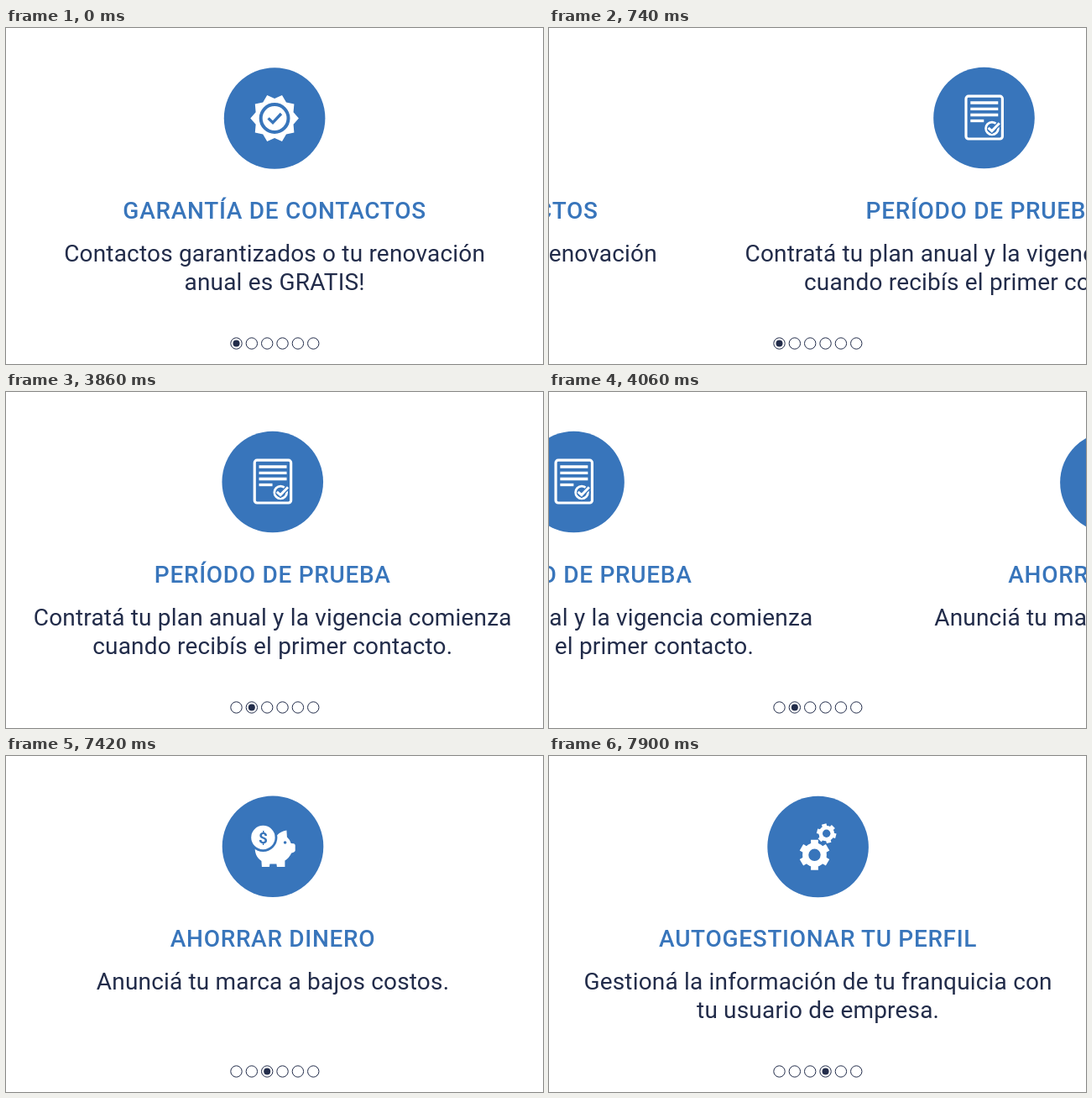
Write an HTML page with a canvas that moves like this. It is 640x400 px and loops after 8000 ms.

```html
<!DOCTYPE html>
<html lang="es">
<head>
<meta charset="utf-8">
<title>Beneficios</title>
<style>
  html, body { margin: 0; width: 100%; height: 100%; overflow: hidden; background: #fff; }
  canvas { display: block; width: 640px; height: 400px; }
</style>
</head>
<body>
<canvas id="stage"></canvas>
<script>
const W = 640, H = 400, LOOP = 8000;
const BLUE = '#3875bb', NAVY = '#222c4a', WHITE = '#fff';
const canvas = document.getElementById('stage');
const ctx = canvas.getContext('2d');
const ratio = window.devicePixelRatio || 1;
canvas.width = W * ratio;
canvas.height = H * ratio;

const slides = [
  { title: 'GARANTÍA DE CONTACTOS', cx: 320.1, cy: 107.5, icon: drawBadge,
    lines: ['Contactos garantizados o tu renovación', 'anual es GRATIS!'] },
  { title: 'PERÍODO DE PRUEBA', cx: 320.7, cy: 107, icon: drawDocument,
    lines: ['Contratá tu plan anual y la vigencia comienza', 'cuando recibís el primer contacto.'] },
  { title: 'AHORRAR DINERO', cx: 320.6, cy: 107.7, icon: drawPiggy,
    lines: ['Anunciá tu marca a bajos costos.'] },
  { title: 'AUTOGESTIONAR TU PERFIL', cx: 320.6, cy: 108, icon: drawGears,
    lines: ['Gestioná la información de tu franquicia con', 'tu usuario de empresa.'] }
];

// Visible span of each slide change and the start of its easing curve
const moves = [
  { from: 500, to: 940, start: 406 },
  { from: 3860, to: 4300, start: 3767 },
  { from: 7420, to: 7900, start: 7330 }
];
const MOVE_MS = 600, STEP_MS = 40;

function easeInOutQuart(t) {
  return t < 0.5 ? 8 * t ** 4 : 1 - 8 * (1 - t) ** 4;
}

function disc(x, y, r, color) {
  ctx.beginPath();
  ctx.arc(x, y, r, 0, Math.PI * 2);
  ctx.fillStyle = color;
  ctx.fill();
}

function ring(x, y, r, width, color) {
  ctx.beginPath();
  ctx.arc(x, y, r, 0, Math.PI * 2);
  ctx.lineWidth = width;
  ctx.strokeStyle = color;
  ctx.stroke();
}

function polyline(points, width, color) {
  ctx.beginPath();
  points.forEach(([x, y]) => ctx.lineTo(x, y));
  ctx.lineWidth = width;
  ctx.strokeStyle = color;
  ctx.stroke();
}

function polygon(points, color) {
  ctx.beginPath();
  points.forEach(([x, y]) => ctx.lineTo(x, y));
  ctx.closePath();
  ctx.fillStyle = color;
  ctx.fill();
}

function polar(x, y, r, angle) {
  return [x + r * Math.cos(angle), y + r * Math.sin(angle)];
}

function drawBadge() {
  const x = 320.1, y = 107.5, star = [];
  for (let i = 0; i < 20; i++) {
    star.push(polar(x, y, i % 2 ? 23.6 : 28.8, i * Math.PI / 10));
  }
  polygon(star, WHITE);
  ring(x, y, 16.4, 4, BLUE);
  polyline([[312.6, 107.4], [318, 112.6], [328, 102]], 3.4, BLUE);
}

function drawDocument() {
  ctx.beginPath();
  ctx.roundRect(299.2, 81.2, 43.4, 50.8, 3);
  ctx.lineWidth = 3.2;
  ctx.strokeStyle = WHITE;
  ctx.stroke();
  [89, 96.3, 103.5, 110.5].forEach((y, i) =>
    polyline([[304.5, y], [i < 3 ? 337.5 : 320.5, y]], 3.3, WHITE));
  disc(330.2, 119.5, 10.5, BLUE);
  ring(330.2, 119.5, 7.4, 2.8, WHITE);
  const check = [[325.8, 118.8], [330, 122.6], [339, 113.3]];
  polyline(check, 5.6, BLUE);
  polyline(check, 3, WHITE);
}

function drawPiggy() {
  ctx.fillStyle = WHITE;
  ctx.beginPath();
  ctx.moveTo(299.5, 107);
  ctx.bezierCurveTo(302, 97, 312, 93.5, 326, 94);
  ctx.quadraticCurveTo(330, 89.5, 337, 88.5);
  ctx.lineTo(337.5, 96.5);
  ctx.quadraticCurveTo(341, 99.5, 342.3, 104);
  ctx.lineTo(345.5, 104.3);
  ctx.quadraticCurveTo(347.3, 104.5, 347.3, 106.5);
  ctx.lineTo(347.3, 112.5);
  ctx.quadraticCurveTo(347, 114.5, 342.8, 115.5);
  ctx.quadraticCurveTo(340, 121.5, 335, 124.5);
  ctx.lineTo(335, 132);
  ctx.lineTo(325.5, 132);
  ctx.lineTo(325, 128.5);
  ctx.lineTo(317, 128.5);
  ctx.lineTo(316.5, 132);
  ctx.lineTo(307.5, 132);
  ctx.lineTo(307, 125);
  ctx.bezierCurveTo(301, 121, 298.5, 114, 299.5, 107);
  ctx.fill();
  disc(335.2, 103, 1.8, BLUE);
  disc(309, 97, 17, BLUE);
  disc(309, 97, 14.2, WHITE);
  ctx.fillStyle = BLUE;
  ctx.font = '700 19px Roboto, sans-serif';
  ctx.letterSpacing = '0px';
  ctx.fillText('$', 309, 103.6);
}

function gear(x, y, r, turn, hole) {
  const points = [], step = Math.PI / 3, root = r * 0.77;
  for (let i = 0; i < 6; i++) {
    const a = turn + i * step;
    points.push(
      polar(x, y, root, a - 0.31), polar(x, y, r, a - 0.24),
      polar(x, y, r, a + 0.24), polar(x, y, root, a + 0.31));
  }
  polygon(points, WHITE);
  disc(x, y, root, WHITE);
  disc(x, y, hole, BLUE);
}

function drawGears() {
  gear(316.5, 117.8, 18.5, Math.PI / 2, 7.2);
  gear(330.7, 92.2, 11.9, Math.PI / 12, 4.7);
}

function drawText(text, x, y, weight, spacing, color) {
  ctx.font = `${weight} 28px Roboto, sans-serif`;
  ctx.fontKerning = 'normal';
  ctx.letterSpacing = spacing + 'px';
  ctx.fillStyle = color;
  ctx.fillText(text, x, y);
}

function drawSlide(slide, x) {
  ctx.save();
  ctx.translate(x, 0);
  ctx.textAlign = 'center';
  disc(slide.cx, slide.cy, 60.3, BLUE);
  slide.icon();
  drawText(slide.title, slide.cx, 227, 500, 0.7, BLUE);
  slide.lines.forEach((line, i) =>
    drawText(line, slide.cx, 278 + i * 33.6, 400, 0.18, NAVY));
  ctx.restore();
}

function drawDots(active) {
  for (let i = 0; i < 6; i++) {
    const x = 274.5 + i * 18.35;
    ring(x, 375.5, 6.7, 1, NAVY);
    if (i === active) disc(x, 375.5, 4, NAVY);
  }
}

function render(time) {
  const t = Math.floor((time - 20) / STEP_MS) * STEP_MS + 20;
  let position = 0, active = 0;
  for (const move of moves) {
    if (t >= move.to) {
      position++;
      active++;
    } else if (t >= move.from) {
      position += easeInOutQuart((t - move.start) / MOVE_MS);
    }
  }
  ctx.setTransform(ratio, 0, 0, ratio, 0, 0);
  ctx.fillStyle = WHITE;
  ctx.fillRect(0, 0, W, H);
  slides.forEach((slide, i) => {
    if (Math.abs(i - position) < 1) drawSlide(slide, (i - position) * W);
  });
  drawDots(active);
}

const begin = performance.now();
function tick() {
  render((performance.now() - begin) % LOOP);
  requestAnimationFrame(tick);
}
tick();
</script>
</body>
</html>
```
